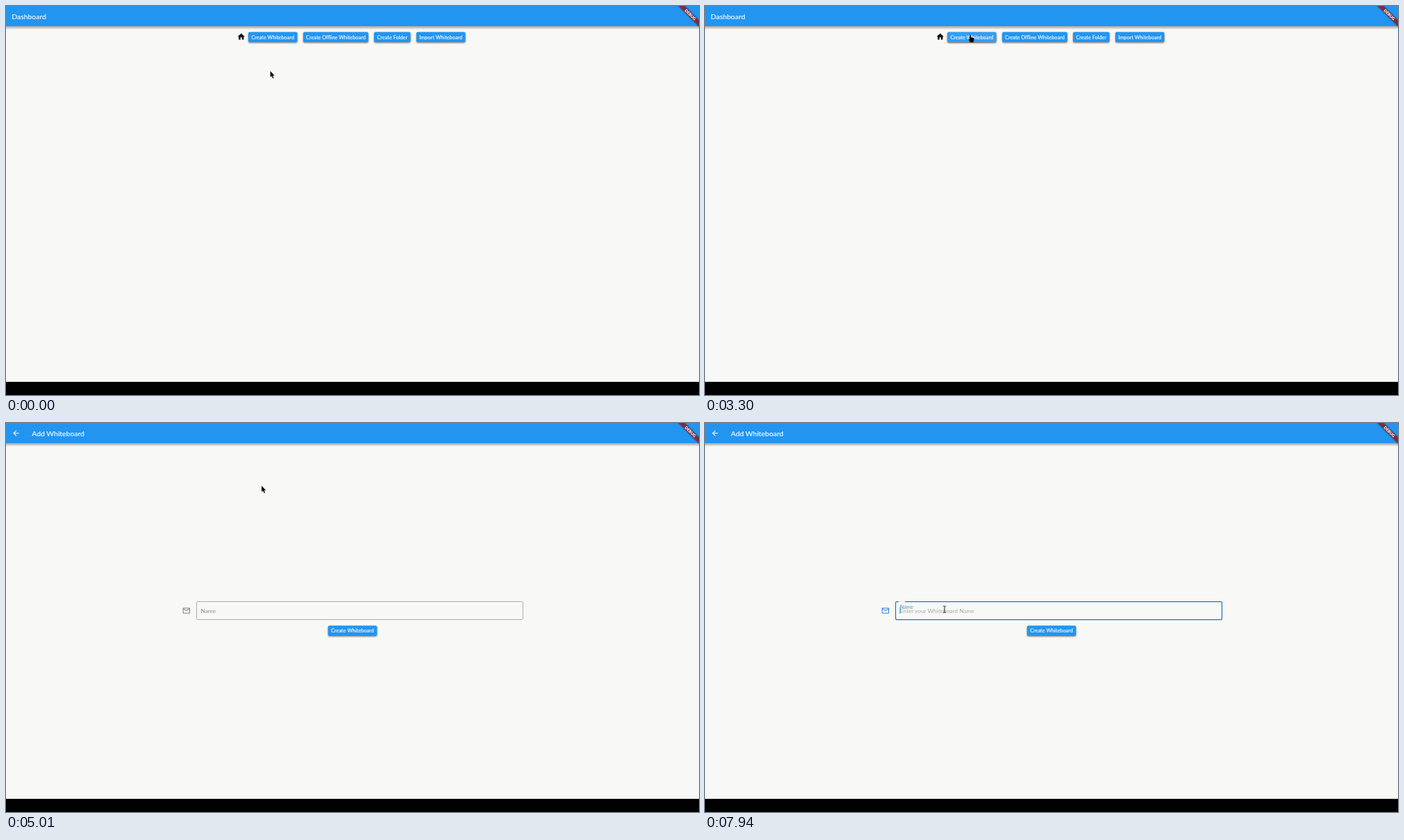
These frames come from a looping animation (998x561 px, 8 s). An HTML page:

```html
<!DOCTYPE html>
<html lang="en">
<head>
<meta charset="utf-8">
<title>Whiteboard dashboard</title>
<style>
html, body { margin: 0; width: 100%; height: 100%; overflow: hidden; background: #f8f8f6; }
svg { display: block; width: 100vw; height: 100vh; }
text { font-family: Lato, "Open Sans", sans-serif; white-space: pre; }
.page { fill: #f8f8f6; }
.bar { fill: #2295f1; }
.title, .btn text { fill: #fff; stroke: #fff; stroke-width: .15px; }
.title { font-size: 10.4px; }
.btn text { font-size: 7.35px; text-anchor: middle; }
.field { font-size: 8.32px; }
</style>
</head>
<body>
<svg viewBox="0 0 998 561" xmlns="http://www.w3.org/2000/svg">
  <defs>
    <linearGradient id="shade" x1="0" y1="0" x2="0" y2="1">
      <stop offset="0" stop-color="#000" stop-opacity=".34"/>
      <stop offset=".45" stop-color="#000" stop-opacity=".2"/>
      <stop offset="1" stop-color="#000" stop-opacity="0"/>
    </linearGradient>
    <filter id="soft" x="-20%" y="-60%" width="140%" height="220%"><feGaussianBlur stdDeviation="1"/></filter>
  </defs>

  <g id="home">
    <rect class="page" width="998" height="561"/>
    <rect y="29" width="998" height="5" fill="url(#shade)"/>
    <rect class="bar" width="998" height="29"/>
    <text class="title" x="8.3" y="18.7">Dashboard</text>
    <path transform="translate(332.5 38) scale(.52)" d="M10 20v-6h4v6h5v-8h3L12 3 2 12h3v8z" fill="#111"/>
  </g>

  <g id="form">
    <rect class="page" width="998" height="561"/>
    <rect y="29" width="998" height="5" fill="url(#shade)"/>
    <rect class="bar" width="998" height="29"/>
    <path transform="translate(8.3 8.5) scale(.52)" fill="#fff"
      d="M20 11H7.83l5.59-5.59L12 4l-8 8 8 8 1.41-1.41L7.83 13H20z"/>
    <text class="title" x="37.3" y="18.7">Add Whiteboard</text>
    <path id="mail" transform="translate(253.6 264.4) scale(.52)"
      d="M20 4H4c-1.1 0-2 .9-2 2v12c0 1.1.9 2 2 2h16c1.1 0 2-.9 2-2V6c0-1.1-.9-2-2-2zm0 14H4V8l8 5 8-5v10zm-8-7L4 6h16l-8 5z"/>
    <rect id="border" x="274.5" y="257.5" width="470" height="26" rx="2" fill="none"/>
    <rect id="gap" class="page" x="279" y="256.4" height="2.4"/>
    <text id="hint" class="field" x="280.7" y="273.5" fill="#858585">Enter your Whiteboard Name</text>
    <text id="label" class="field">Name</text>
    <rect id="caret" x="280.4" y="265.5" width="1.1" height="9.5" fill="#2196f3"/>
  </g>

  <rect y="542" width="998" height="19" fill="#000"/>

  <g transform="translate(998 0) rotate(45)">
    <rect x="-34" y="14.6" width="68" height="6.2" fill="#000" opacity=".5" filter="url(#soft)"/>
    <rect x="-34" y="14.6" width="68" height="6.2" fill="#b71c1c" opacity=".63"/>
    <text y="19.7" font-size="5.7" font-weight="900" fill="#fff" text-anchor="middle">DEBUG</text>
  </g>

  <g id="pointer">
    <path id="arrow" d="M0 0V9.2L2 7.4 3.7 10.9 5.3 10.2 3.7 6.9H6.4Z" fill="#000" stroke="#fff" stroke-opacity=".5" stroke-width=".5"/>
    <path id="hand" fill="#000" stroke="#fff" stroke-opacity=".35" stroke-width=".4"
      d="M-.9 0Q0-1.3 .9 0V3.2L4.6 4Q5.8 4.4 5.6 5.8L4.8 10.6H-.2L-2.4 6.9Q-2.6 5.6-.9 6.2Z"/>
    <path id="beam" d="M-2.1-4.7Q-.3-4.7 0-4Q.3-4.7 2.1-4.7M0-4V4M-2.1 4.7Q-.3 4.7 0 4Q.3 4.7 2.1 4.7"
      fill="none" stroke="#222" stroke-width="1"/>
  </g>
</svg>
<script>
const LOOP = 8000, NS = "http://www.w3.org/2000/svg";
const $ = id => document.getElementById(id);
const clamp = v => Math.max(0, Math.min(1, v));
const ramp = (t, a, b) => clamp((t - a) / (b - a));
const mix = (a, b, k) => a + (b - a) * k;
const blend = (a, b, k) => `rgb(${a.map((v, i) => Math.round(mix(v, b[i], k)))})`;
const set = (el, attrs) => { for (const k in attrs) el.setAttribute(k, attrs[k]); };
const show = (el, on) => el.setAttribute("visibility", on ? "visible" : "hidden");

function add(parent, tag, attrs) {
  const el = document.createElementNS(NS, tag);
  set(el, attrs);
  return parent.appendChild(el);
}

function button(page, x, y, w, caption) {
  const g = add($(page), "g", { class: "btn" });
  const box = { x, y, width: w, height: 14.5, rx: 2 };
  const shadow = add(g, "rect", { ...box, y: y + 1.2, fill: "#000", filter: "url(#soft)" });
  const face = add(g, "rect", box);
  add(g, "text", { x: x + w / 2, y: y + 9.9 }).textContent = caption;
  return { page, x, y, w, shadow, face };
}

const buttons = [
  button("home", 349, 37.6, 70.5, "Create Whiteboard"),
  button("home", 428, 37.6, 93.8, "Create Offline Whiteboard"),
  button("home", 530, 37.6, 52.5, "Create Folder"),
  button("home", 591, 37.6, 70.5, "Import Whiteboard"),
  button("form", 463.8, 292.2, 70.5, "Create Whiteboard")
];

// Pointer stops: time, x, y
const stops = [
  [850, 380.5, 93.5], [990, 377, 99], [1390, 384.5, 52.6], [1670, 384.5, 52.6],
  [1880, 392, 46], [2130, 370, 43], [2410, 380, 40], [2510, 380, 40],
  [2720, 360, 42], [3020, 414, 46], [3300, 382, 42], [3400, 382, 42],
  [3540, 368, 43], [3680, 380, 40], [4020, 380, 40], [4480, 376, 72],
  [4630, 376, 72], [5010, 368, 90.3], [5250, 482, 299], [5430, 420, 284],
  [5730, 345, 271], [6030, 345, 271], [6260, 344.5, 259], [6500, 345.5, 274],
  [6750, 345, 267], [6890, 345, 267], [7310, 345, 268.8]
];

function pointerAt(t) {
  const i = stops.findIndex(s => s[0] > t);
  if (i < 0) return stops[stops.length - 1].slice(1);
  if (i === 0) return stops[0].slice(1);
  const [a, b] = [stops[i - 1], stops[i]];
  const u = ramp(t, a[0], b[0]), k = u * u * (3 - 2 * u);
  return [mix(a[1], b[1], k), mix(a[2], b[2], k)];
}

// Incoming page: opacity and downward shift
function pageState(t) {
  if (t < 3830) return [0, 0];
  if (t < 3920) return [.56, 5];
  if (t < 4020) return [.76, 2];
  return [1, 0];
}

function drawField(t) {
  const focus = ramp(t, 7780, 7920), float = .41 * ramp(t, 7870, 7940);
  const grey = t < 6850 ? 172 : 164;
  set($("border"), {
    stroke: blend([grey, grey, grey], [35, 116, 184], focus),
    "stroke-width": mix(1, 1.25, focus)
  });
  set($("mail"), { fill: blend([125, 125, 125], [33, 134, 220], focus) });
  set($("gap"), { width: 22 * float });
  set($("hint"), { opacity: 1.7 * float });
  set($("label"), {
    transform: `translate(280.5 ${mix(273.7, 260.2, float)}) scale(${mix(1, .75, float)})`,
    fill: blend([138, 138, 138], [33, 150, 243], float)
  });
  show($("caret"), float > .1);
}

function draw(t) {
  const [opacity, shift] = pageState(t);
  const page = opacity ? "form" : "home";
  set($("form"), { opacity, transform: `translate(0 ${shift})` });

  const [x, y] = pointerAt(t);
  let over = false;
  for (const b of buttons) {
    const hit = b.page === page && x > b.x && x < b.x + b.w && y > b.y && y < b.y + 14.5;
    over = over || hit;
    set(b.face, { fill: hit ? "#339ef4" : "#2295f1" });
    set(b.shadow, { opacity: hit ? .65 : .52 });
  }
  const inField = page === "form" && x > 274 && x < 745 && y > 257 && y < 284;
  show($("hand"), over);
  show($("beam"), inField);
  show($("arrow"), !over && !inField);
  set($("pointer"), { transform: `translate(${x} ${y})` });
  drawField(t);
}

const start = performance.now();
function tick() {
  draw((performance.now() - start) % LOOP);
  requestAnimationFrame(tick);
}
tick();
</script>
</body>
</html>
```
